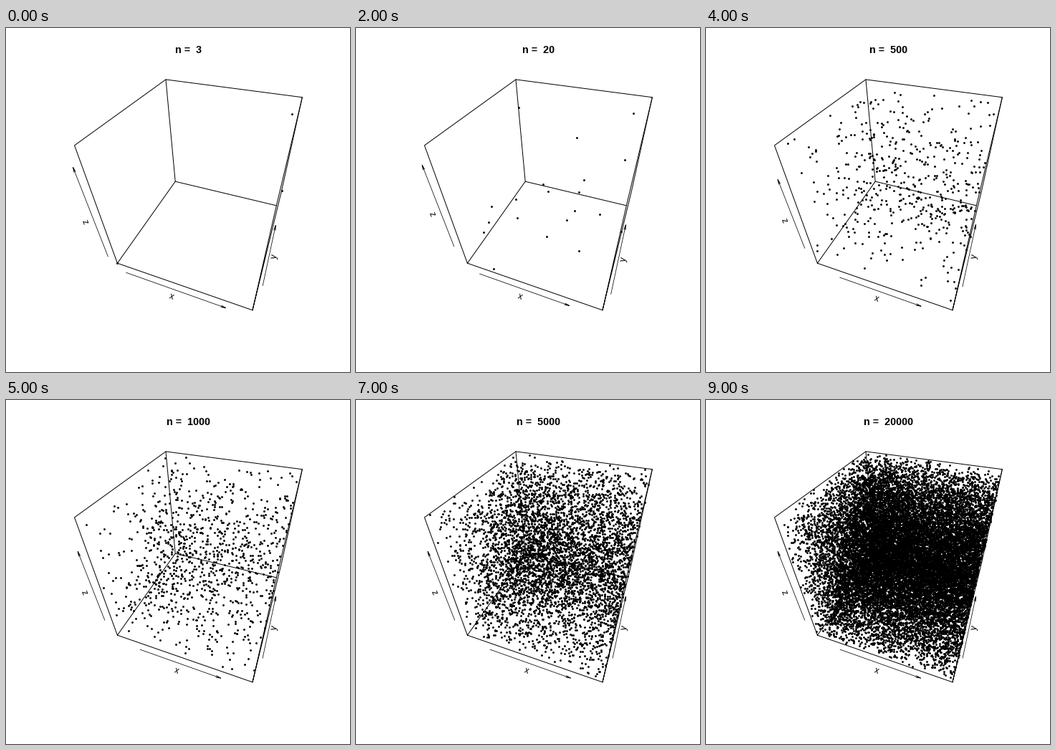
Recreate the animation shown at these times as a matplotlib script. Size 480 by 480 pixels, loop 10000 ms.

```python
import numpy as np
import matplotlib.pyplot as plt
from matplotlib.animation import FuncAnimation

SIZE, DPI = 480, 100
PX = 72 / DPI                      # one pixel in points
THETA, PHI = np.radians([20, 40])
EYE = 2 + np.sqrt(3)               # camera distance from the cube centre
ZOOM, CX, CY = 374.6, 278.0, 218.2
COUNTS = [3, 10, 20, 100, 500, 1000, 2000, 5000, 10000, 20000]

# Every sample opens with these points; the rest are uniform
START = np.array([(.132, .26, .119), (.932, .265, .893), (.897, .944, .798)])

# Direction in which each axis arrow is moved away from its cube edge
OUTWARD = np.array([(0, -1, -1), (1, 0, -1), (-1, -1, 0)])


def project(p):
    """Perspective view of points in the cube [-1, 1]^3, in pixels."""
    x, y, z = np.asarray(p, float).T
    right = x * np.cos(THETA) + y * np.sin(THETA)
    near = x * np.sin(THETA) - y * np.cos(THETA)
    up = z * np.cos(PHI) - near * np.sin(PHI)
    depth = EYE - z * np.sin(PHI) - near * np.cos(PHI)
    return np.column_stack([CX + ZOOM * right / depth,
                            CY - ZOOM * up / depth])


def sample(n):
    """Screen dots and arrow ranges, both scaled to the data's extent."""
    rest = np.random.default_rng(n).random((n - len(START), 3))
    data = np.vstack([START, rest])
    lo, hi = data.min(axis=0), data.max(axis=0)

    def scale(v):
        return 2 * (v - lo) / (hi - lo) - 1

    # Arrows run between the outermost multiples of 0.2 inside the data
    ends = scale(np.array([np.ceil(lo * 5), np.floor(hi * 5)]) / 5)
    return project(scale(data)), ends.T


def axis_point(axis, value, gap):
    p = OUTWARD[axis] * (1 + gap)
    p[axis] = value
    return project([p])[0]


def arrow_path(a, b, length=7.2, spread=np.radians(10)):
    """Shaft, then an open head at b."""
    back = np.arctan2(*(a - b)[::-1])
    left, right = (b + length * np.array([np.cos(back + s), np.sin(back + s)])
                   for s in (-spread, spread))
    return np.array([a, b, (np.nan, np.nan), left, b, right])


fig = plt.figure(figsize=(SIZE / DPI, SIZE / DPI), dpi=DPI, facecolor="white")
ax = fig.add_axes([0, 0, 1, 1])
ax.set(xlim=(0, SIZE), ylim=(SIZE, 0))
ax.axis("off")

# The faces turned away from the viewer: bottom, left, back and right
EDGE_LOOPS = [
    [(-1, -1, -1), (1, -1, -1), (1, 1, -1), (-1, 1, -1), (-1, -1, -1),
     (-1, -1, 1), (-1, 1, 1), (1, 1, 1), (1, -1, 1), (1, -1, -1)],
    [(-1, 1, -1), (-1, 1, 1)],
    [(1, 1, -1), (1, 1, 1)],
]
for loop in EDGE_LOOPS:
    ax.plot(*project(loop).T, color="black", lw=PX, zorder=1,
            solid_joinstyle="round")

arrows = [ax.plot([], [], color="black", lw=.75 * PX, zorder=1,
                  solid_joinstyle="round", solid_capstyle="butt")[0]
          for _ in range(3)]
labels = [ax.text(0, 0, s, family="Liberation Sans", size=12 * PX,
                  ha="center", va="baseline", rotation_mode="anchor")
          for s in "xyz"]
title = ax.text(254.2, 35, "", family="Liberation Sans", weight="bold",
                size=14.25 * PX, ha="center", va="baseline")
dots, = ax.plot([], [], "o", color="black", ms=2.9 * PX, mew=0, zorder=2,
                snap=False)


def draw(i):
    n = COUNTS[i]
    spots, ranges = sample(n)
    dots.set_data(*spots.T)
    title.set_text(f"n =  {n}")
    for k, (lo, hi) in enumerate(ranges):
        a, b = axis_point(k, lo, .06), axis_point(k, hi, .06)
        arrows[k].set_data(*arrow_path(a, b).T)
        dx, dy = b - a
        angle = np.arctan(-dy / dx)
        drop = 5.3 * np.array([np.sin(angle), np.cos(angle)])
        labels[k].set_position(axis_point(k, (lo + hi) / 2, .12) + drop)
        labels[k].set_rotation(np.degrees(angle))
    return [dots, title, *arrows, *labels]


anim = FuncAnimation(fig, draw, frames=len(COUNTS), interval=1000,
                     repeat=True, repeat_delay=0)
plt.show()
```
